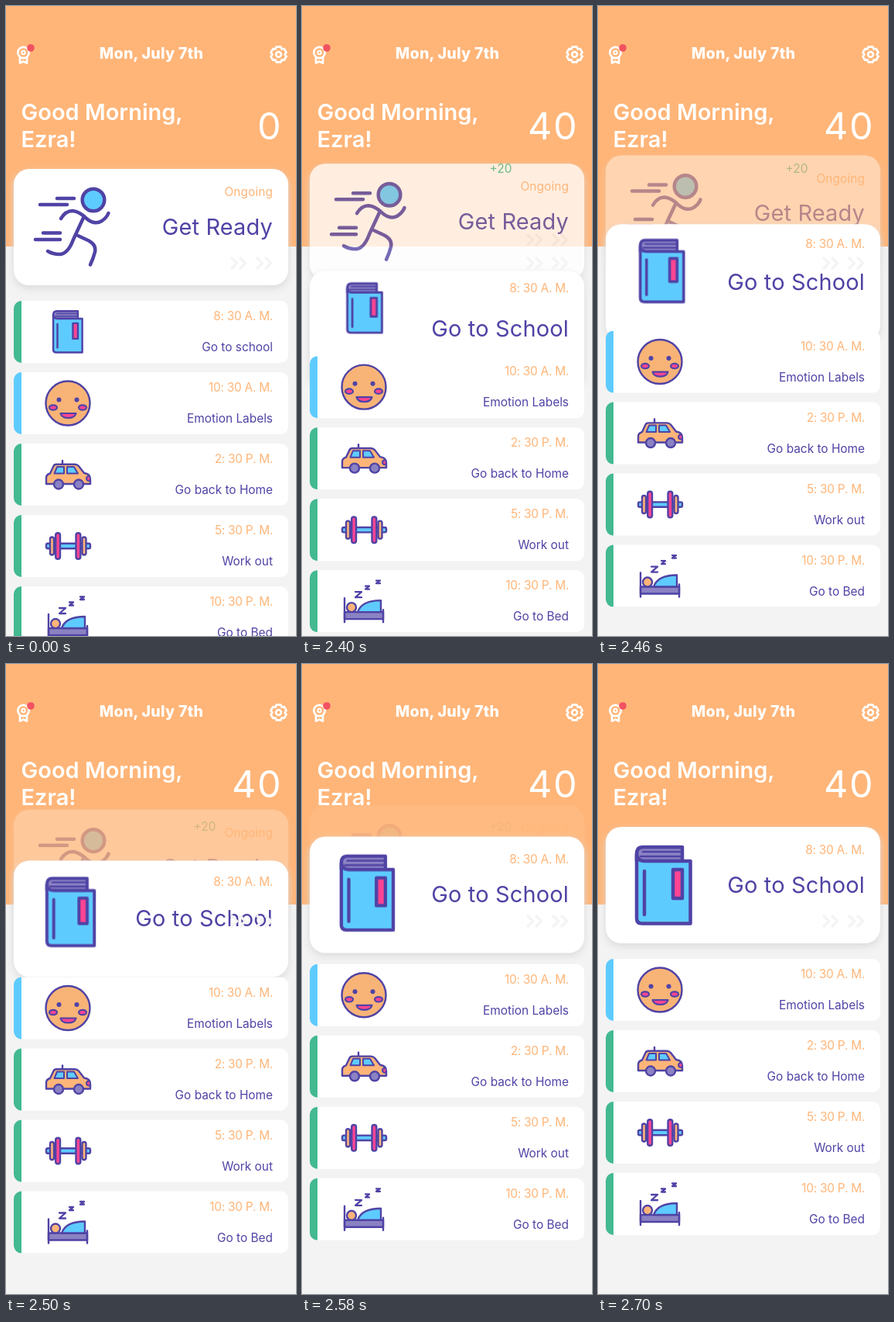
An HTML page that plays this animation: 375 by 812 pixels, repeating every 4.7 s.

```html
<!DOCTYPE html>
<html lang="en">
<head>
<meta charset="utf-8">
<title>Daily schedule</title>
<style>
  html, body { margin: 0; width: 100%; height: 100%; overflow: hidden; background: #f3f3f3; }
  svg.stage { display: block; width: 375px; height: 812px; }
  text { font-family: Inter, Roboto, sans-serif; }
  .date { font-size: 19.6px; font-weight: 800; fill: #fff; text-anchor: middle; letter-spacing: .25px; }
  .hello { font-size: 29px; font-weight: 600; fill: #fff; }
  .score { font-size: 48.5px; font-weight: 400; fill: #fff; text-anchor: end; letter-spacing: 1.5px; }
  .time { font-size: 15.4px; fill: #ffb578; text-anchor: end; letter-spacing: -.25px; }
  .task { font-size: 15.4px; fill: #4f43a5; text-anchor: end; }
  .title { font-size: 28.9px; fill: #4f43a5; text-anchor: end; letter-spacing: .2px; }
  .gain { font-size: 15.4px; fill: #43b990; text-anchor: middle; }
  .card { fill: #fff; filter: drop-shadow(0 4px 5px #dbdbdb); }
  .ink { stroke: #4f43a5; stroke-width: 2.4; stroke-linecap: round; stroke-linejoin: round; fill: none; }
  .blue { fill: #5ecbff; }
  .pink { fill: #ff4593; }
  .tan { fill: #ffb578; }
  .lilac { fill: #8b82c3; }
  .green { fill: #43b990; }
  .white { fill: none; stroke: #fff; stroke-width: 2.7; stroke-linejoin: round; }

  .before, .after, .move, .fade, .grow { animation: 4700ms infinite both; }
  .before { animation-name: before; animation-timing-function: step-end; }
  .after { animation-name: after; animation-timing-function: step-end; }
  .move { animation-name: move; }
  .fade { animation-name: fade; }
  .grow { animation-name: grow; }
  @keyframes before { 0% { visibility: visible; } 50.21%, 100% { visibility: hidden; } }
  @keyframes after { 0% { visibility: hidden; } 50.21%, 100% { visibility: visible; } }
  /* the swap lands 20 ms into a 360 ms ease */
  @keyframes move {
    0%, 49.787% { transform: translateY(0); animation-timing-function: ease; }
    57.447%, 100% { transform: translateY(var(--d)); }
  }
  @keyframes fade {
    0%, 49.787% { opacity: 1; animation-timing-function: ease; }
    57.447%, 100% { opacity: 0; }
  }
  @keyframes grow {
    0%, 49.787% { transform: translate(80px, 419.7px) scale(.54); animation-timing-function: ease; }
    57.447%, 100% { transform: translate(85px, 285px) scale(1); }
  }
</style>
</head>
<body>
<svg class="stage" viewBox="0 0 375 812">
  <defs>
    <g id="slot">
      <path d="M20 0H355a10 10 0 0 1 10 10V70a10 10 0 0 1-10 10H20z" fill="#fff"/>
      <path d="M20 0V80a10 10 0 0 1-10-10V10a10 10 0 0 1 10-10z"/>
    </g>

    <g id="arrows" fill="none" stroke="#f4f4f4" stroke-width="3.4">
      <path id="pair" d="M291 324l7.5 7.5-7.5 7.5M302 324l7.5 7.5-7.5 7.5"/>
      <use href="#pair" x="33"/>
    </g>

    <g id="book" class="ink" style="stroke-width:4.5">
      <path class="lilac" d="M24-31V-49H-27Q-35-49-35-40V-31z"/>
      <path d="M-27-43H22M-30-37H22" stroke-width="2.6"/>
      <path class="blue" d="M-35-40Q-34-31-25-31H34.500V49.500H-28Q-35 49.500-35 43z"/>
      <path d="M-25-18V38"/>
      <path class="pink" d="M12-20H24V17H12z"/>
    </g>

    <g id="runner" class="ink" style="stroke-width:4.5">
      <circle class="blue" cx="113" cy="250" r="14.3"/>
      <path d="M66 248H88M44 256H79M48 292.500H70M38 301H70"/>
      <path d="M71 274Q77 264 86 264Q95 265 103 273Q114 283 124 277Q130 273 132.500 267"/>
      <path d="M101 271L87 301Q80 320 69 320Q61 320 54 316"/>
      <path d="M93 296L107 302.500Q117 308 115 317Q113 325 109 333.500"/>
    </g>

    <g id="face" class="ink">
      <circle cx="80" cy="40" r="28.500" fill="#f8b377"/>
      <g fill="#4f43a5" stroke="none"><circle cx="68.500" cy="35.500" r="3"/><circle cx="91.500" cy="35.500" r="3"/></g>
      <g class="pink" stroke-width="2.200">
        <ellipse cx="61" cy="45.500" rx="5" ry="3.200"/>
        <ellipse cx="99" cy="45.500" rx="5" ry="3.200"/>
        <path d="M70.500 53H90.500Q89 59 80.500 59T70.500 53z"/>
      </g>
    </g>

    <g id="car" class="ink">
      <path d="M73 22V27"/>
      <path class="tan" d="M52 52V44Q52 40 57 38.500L61.500 29Q62.500 26.800 65 26.800H89Q92 26.800 94 29L101 38Q109 39 109 46V52z"/>
      <path class="blue" stroke-width="2" d="M66 30H75V38.500H62.500zM79 30H88L93 38.500H79z"/>
      <path class="pink" stroke-width="2" d="M108 42Q104 42 104 45T108 48"/>
      <circle class="lilac" cx="68" cy="52.500" r="6"/>
      <circle class="lilac" cx="94" cy="52.500" r="6"/>
    </g>

    <g id="weights" class="ink">
      <rect class="blue" x="52" y="36.800" width="57" height="6.400" rx="2"/>
      <g id="plates">
        <rect class="tan" x="57" y="28.500" width="5" height="23" rx="2.500"/>
        <rect class="pink" x="64.200" y="23.200" width="5.800" height="33.600" rx="2.800"/>
      </g>
      <use href="#plates" transform="matrix(-1 0 0 1 160.500 0)"/>
    </g>

    <g id="bed" class="ink">
      <path class="lilac" d="M55 54H105V63H55z"/>
      <path class="blue" d="M72 54Q77 39 102 39V54z"/>
      <circle class="tan" cx="64" cy="48" r="6"/>
      <path d="M55 36V67M105 51V67"/>
      <path d="M69 28H77L69 35H77M82 20.500H87L82 24.500H87M96 13.500H101L96 17H101" stroke-width="2.300"/>
    </g>

    <g id="ready">
      <rect class="card" x="10" y="210" width="355" height="150" rx="20"/>
      <use href="#runner"/>
      <text class="time" x="345" y="245" style="letter-spacing:.1px">Ongoing</text>
      <text class="title" x="345" y="294.500">Get Ready</text>
    </g>

    <g id="rows">
      <g transform="translate(0 472)">
        <use href="#slot" class="blue"/><use href="#face"/>
        <text class="time" x="345" y="25">10: 30 A. M.</text>
        <text class="task" x="345" y="65">Emotion Labels</text>
      </g>
      <g transform="translate(0 564)">
        <use href="#slot" class="green"/><use href="#car"/>
        <text class="time" x="345" y="25">2: 30 P. M.</text>
        <text class="task" x="345" y="65">Go back to Home</text>
      </g>
      <g transform="translate(0 656)">
        <use href="#slot" class="green"/><use href="#weights"/>
        <text class="time" x="345" y="25">5: 30 P. M.</text>
        <text class="task" x="345" y="65">Work out</text>
      </g>
      <g transform="translate(0 748)">
        <use href="#slot" class="green"/><use href="#bed"/>
        <text class="time" x="345" y="25">10: 30 P. M.</text>
        <text class="task" x="345" y="65">Go to Bed</text>
      </g>
    </g>
  </defs>

  <rect width="375" height="812" fill="#f3f3f3"/>
  <rect width="375" height="310" class="tan"/>

  <g class="white">
    <circle cx="22.500" cy="60" r="7.200"/>
    <circle cx="22.500" cy="60" r="2.200" stroke-width="2"/>
    <path d="M18 66V73.500L22.500 71.500L27 73.500V66"/>
    <g transform="translate(352.500 62.500)">
      <path d="M-2.800-9.900H2.800L4-6.900 7.200-7.400 10-2.500 8 0 10 2.500 7.200 7.400 4 6.900 2.800 9.900H-2.800L-4 6.900-7.200 7.400-10 2.500-8 0-10-2.500-7.200-7.400-4-6.900z"/>
      <circle r="3.400"/>
    </g>
  </g>
  <circle cx="32" cy="54" r="4.800" fill="#f25260"/>
  <text class="date" x="188" y="68.300">Mon, July 7th</text>
  <text class="hello" x="19.500" y="147">Good Morning,</text>
  <text class="hello" x="19.500" y="182">Ezra!</text>

  <g class="before">
    <text class="score" x="357" y="172.300">0</text>
    <use href="#ready"/>
    <g transform="translate(0 380)">
      <use href="#slot" class="green"/>
      <use href="#book" transform="translate(80 39.700) scale(.54)"/>
      <text class="time" x="345" y="25">8: 30 A. M.</text>
      <text class="task" x="345" y="65">Go to school</text>
    </g>
    <use href="#rows"/>
  </g>

  <g class="after">
    <text class="score" x="357" y="172.300">40</text>
    <g class="fade">
      <g class="move" style="--d:-30px"><use href="#ready"/></g>
      <use href="#arrows" y="-30"/>
      <text class="gain" x="257" y="215">+20</text>
    </g>
    <g class="move" style="--d:-170px">
      <rect class="card" x="10" y="380" width="355" height="150" rx="20"/>
      <text class="title" x="345" y="464.500">Go to School</text>
    </g>
    <g class="move" style="--d:-160px"><text class="time" x="345" y="405">8: 30 A. M.</text></g>
    <g class="grow"><use href="#book"/></g>
    <g class="move" style="--d:-92px"><use href="#rows"/></g>
  </g>

  <use href="#arrows"/>
</svg>
</body>
</html>
```
